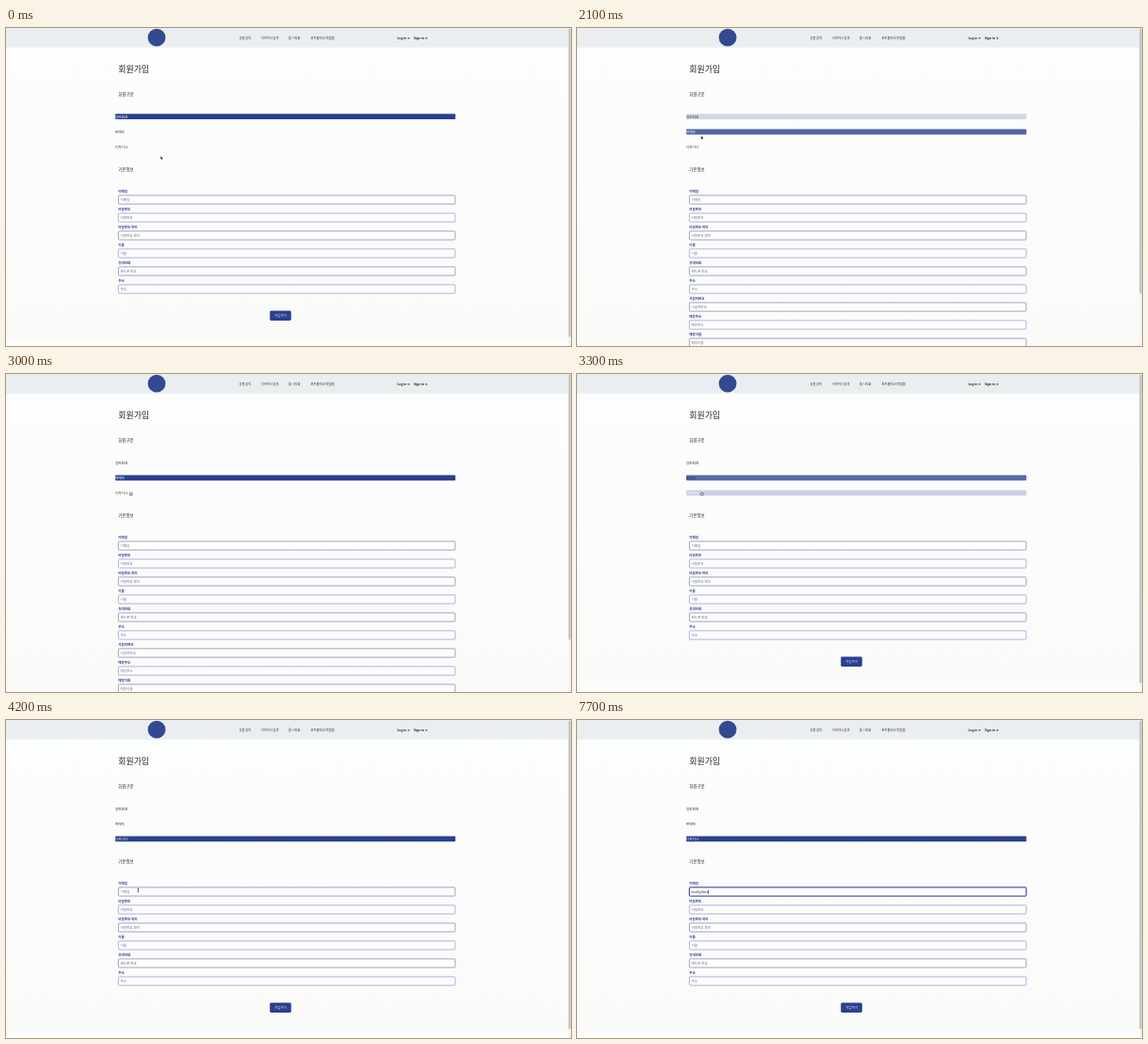
Animation, 600 px wide and 338 px high, one loop 8 s. Source, as an HTML page with a canvas:

```html
<!DOCTYPE html>
<html lang="ko">
<head>
<meta charset="utf-8">
<style>
  html, body { margin: 0; width: 100%; height: 100%; overflow: hidden; background: #fcfcfc; }
  canvas { display: block; width: 600px; height: 338px; }
</style>
</head>
<body>
<canvas id="stage" width="600" height="338"></canvas>
<script>
const ctx = document.getElementById('stage').getContext('2d');
const LOOP = 8000, TICK = 100;
const BLUE = '#2a3f8f', INK = '#333';
const FAMILY = '"Noto Sans CJK KR", "Noto Sans CJK JP", "Noto Sans", sans-serif';

const MENU = [['상품 검색', 247.5], ['디자이너 검색', 271], ['룸 시각화', 300], ['포트폴리오(작업물)', 323.5]];
const ROLES = ['일반회원', '판매자', '디자이너'];
const FIELDS = [
  ['이메일', '이메일'], ['비밀번호', '비밀번호'], ['비밀번호 확인', '비밀번호 확인'],
  ['이름', '이름'], ['휴대전화', '핸드폰 번호'], ['주소', '주소'],
  ['사업자번호', '사업자번호'], ['매장주소', '매장주소'], ['매장이름', '매장이름']
];
const TYPED = 'box4@fact';
const KEYS = [5800, 6000, 6100, 6600, 6900, 7300, 7500, 7500, 7700];

// time, x, y of the pointer tip
const PATH = [
  [200, 164.4, 136.2], [1100, 144, 114.5], [1400, 135, 106], [1600, 135, 106],
  [1800, 133, 110], [2300, 131, 118], [2500, 131, 118], [3000, 131.5, 126],
  [3300, 131.5, 126], [3700, 132, 127], [4200, 140.2, 181]
];

function text(str, x, y, size, color = INK, weight = 400) {
  // Drawn large and scaled down for subpixel glyph placement.
  ctx.save();
  ctx.translate(x, y + size * 0.37);
  ctx.scale(0.1, 0.1);
  ctx.font = `${weight} ${size * 10}px ${FAMILY}`;
  ctx.fillStyle = color;
  ctx.fillText(str, 0, 0);
  const width = ctx.measureText(str).width / 10;
  ctx.restore();
  return width;
}

function box(x, y, w, h, r, color) {
  ctx.fillStyle = color;
  ctx.beginPath();
  ctx.roundRect(x, y, w, h, r);
  ctx.fill();
}

function frame(x, y, w, h, color, lineWidth) {
  ctx.strokeStyle = color;
  ctx.lineWidth = lineWidth;
  ctx.beginPath();
  ctx.roundRect(x, y, w, h, 1);
  ctx.stroke();
}

// The CSS "ease" curve: cubic-bezier(.25, .1, .25, 1)
function ease(p) {
  if (p <= 0) return 0;
  if (p >= 1) return 1;
  let lo = 0, hi = 1;
  for (let i = 0; i < 20; i++) {
    const s = (lo + hi) / 2;
    const x = 0.75 * s * (1 - s) + s ** 3;
    if (x < p) lo = s; else hi = s;
  }
  return 0.3 * lo * (1 - lo) ** 2 + 3 * lo * lo * (1 - lo) + lo ** 3;
}

function pointerAt(t) {
  if (t <= PATH[0][0]) return PATH[0].slice(1);
  for (let i = 1; i < PATH.length; i++) {
    const [t0, x0, y0] = PATH[i - 1], [t1, x1, y1] = PATH[i];
    if (t <= t1) {
      const p = (t - t0) / (t1 - t0);
      return [x0 + (x1 - x0) * p, y0 + (y1 - y0) * p];
    }
  }
  return PATH[PATH.length - 1].slice(1);
}

function drawPage(tall) {
  const bg = ctx.createLinearGradient(0, 21, 0, 333);
  bg.addColorStop(0, '#fcfdfd');
  bg.addColorStop(1, '#fafaf9');
  ctx.fillStyle = bg;
  ctx.fillRect(0, 0, 600, 338);
  if (!tall) box(0, 332.5, 597, 5.5, 0, '#fdfdfd');
  box(0, 0, 597, 20.8, 0, '#ebeef0');
  box(597, 0, 3, 338, 0, '#f5f5f5');
  box(597.4, 0.5, 2.2, tall ? 282 : 328, 1, '#bfc0c1');
  ctx.fillStyle = '#334a91';
  ctx.beginPath();
  ctx.arc(160, 10.2, 9.4, 0, Math.PI * 2);
  ctx.fill();
  for (const [label, x] of MENU) text(label, x, 10.4, 3.2, '#222', 500);
  text('Log in ➔', 415.5, 10.4, 3.3, '#222', 700);
  text('Sign in ➔', 433, 10.4, 3.3, '#222', 700);
  text('회원가입', 119.3, 44.2, 8.9, '#222');
  text('회원구분', 119.3, 70.6, 4.4, '#222', 500);
  text('기본정보', 119.3, 150, 4.4, '#222', 500);
}

function drawRoles(t) {
  const toSeller = t < 1700 ? 0 : ease((t - 1600) / 1000);
  const toDesigner = t < 3300 ? 0 : ease((t - 3130) / 1000);
  const fill = [1 - toSeller, toSeller * (1 - toDesigner), toDesigner];
  const selected = t < 1700 ? 0 : t < 3300 ? 1 : 2;
  ROLES.forEach((role, i) => {
    const y = 94.2 + 16.1 * i;
    ctx.globalAlpha = fill[i];
    box(116, y - 2.9, 361.3, 5.8, 1, BLUE);
    ctx.globalAlpha = 1;
    text(role, 116, y, 3.6, i === selected ? '#fff' : INK);
  });
}

function drawForm(t, tall) {
  const count = tall ? 9 : 6;
  const focused = t >= 4300;
  const typed = TYPED.slice(0, KEYS.filter(k => k <= t).length);
  for (let i = 0; i < count; i++) {
    const top = 177.9 + 19 * i, mid = top + 4.8;
    const active = focused && i === 0;
    text(FIELDS[i][0], 119.3, top - 4.2, 3.5, BLUE, 700);
    if (active) frame(119.4, top, 357.6, 9.2, '#c9d0ec', 2);
    box(119.4, top, 357.6, 9.2, 1, '#fdfdfe');
    frame(119.4, top, 357.6, 9.2, active ? '#324993' : i % 2 ? '#a3acd8' : '#929cb4', active ? 1 : 0.9);
    const hasValue = active && typed;
    const width = text(hasValue ? typed : FIELDS[i][1], 121.4, mid, 3.6, hasValue ? '#222' : '#707379');
    const blinkOff = t >= 4800 && t < 5400;
    if (active && !blinkOff) box(121.1 + (hasValue ? width + 0.2 : 0), mid - 2.3, 0.6, 4.6, 0, '#222');
  }
  if (!tall) {
    box(280.2, 300.5, 22.6, 10.4, 1.4, BLUE);
    text('가입하기', 284.9, 305.8, 3.6, '#eef0fa');
  }
}

function drawPointer(t) {
  if (t >= 4300) return;
  const [x, y] = pointerAt(t);
  ctx.save();
  ctx.translate(x, y);
  ctx.lineWidth = 0.6;
  if (y > 177) {
    box(-0.3, -1.9, 0.7, 3.8, 0, '#222');
    box(-0.9, -2.1, 1.9, 0.5, 0, '#444');
    box(-0.9, 1.6, 1.9, 0.5, 0, '#444');
  } else if (y > 123.5 && y < 129.5 && t > 2500) {
    ctx.beginPath();
    ctx.roundRect(-0.2, 0.2, 2.8, 2.9, 1);
    ctx.fillStyle = '#f4f2fa';
    ctx.fill();
    ctx.strokeStyle = '#333';
    ctx.lineWidth = 0.7;
    ctx.stroke();
  } else {
    ctx.beginPath();
    [[0, 0], [0, 3.2], [0.8, 2.6], [1.3, 3.7], [1.9, 3.4], [1.4, 2.4], [2.3, 2.3]]
      .forEach(([px, py]) => ctx.lineTo(px, py));
    ctx.closePath();
    ctx.strokeStyle = '#fff';
    ctx.stroke();
    ctx.fillStyle = '#111';
    ctx.fill();
  }
  ctx.restore();
}

function render(now) {
  const t = Math.floor((now % LOOP) / TICK) * TICK;
  const tall = t >= 1700 && t < 3300;
  drawPage(tall);
  drawRoles(t);
  drawForm(t, tall);
  drawPointer(t);
}

const start = performance.now();
function loop() {
  render(performance.now() - start);
  requestAnimationFrame(loop);
}
loop();
</script>
</body>
</html>
```
